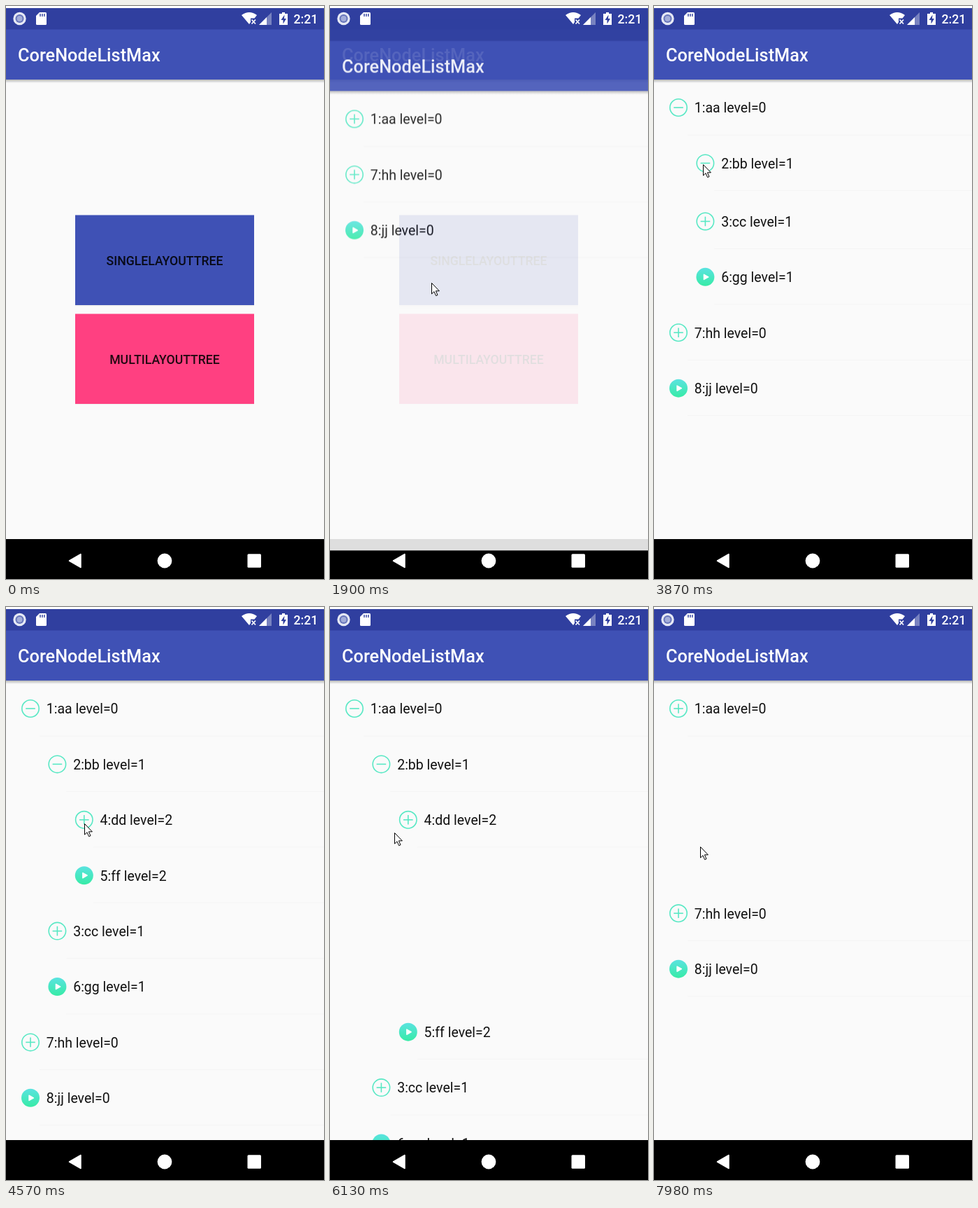
These frames come from a looping animation (455 by 818 pixels, 8 s). An HTML page:

```html
<!DOCTYPE html>
<html lang="en">
<head>
<meta charset="utf-8">
<title>Tree list</title>
<style>
  html, body { margin: 0; width: 100%; height: 100%; overflow: hidden; background: #fff; }
  svg { display: block; width: 455px; height: 818px; font-family: Roboto, sans-serif; }
  .title { font-size: 25.3px; font-weight: 500; fill: #fff; }
  .btn { font-size: 17.7px; font-weight: 500; text-anchor: middle; fill: #000; fill-opacity: .87; }
  .row { font-size: 19.5px; fill: #111; }
  .clock { font-size: 17.7px; font-weight: 500; fill: #fff; }
  .ring { fill: none; stroke: #58e8c4; stroke-width: 1.6; }
</style>
</head>
<body>
<svg viewBox="0 0 455 818">
  <defs>
    <linearGradient id="mint" x1="0" y1="0" x2="0" y2="1">
      <stop offset="0" stop-color="#5ae3e0"/><stop offset="1" stop-color="#37eba6"/>
    </linearGradient>
    <linearGradient id="shade" x1="0" y1="0" x2="0" y2="1">
      <stop offset="0" stop-opacity=".27"/><stop offset="1" stop-opacity="0"/>
    </linearGradient>
    <clipPath id="screen"><rect y="3" width="455" height="815"/></clipPath>
    <g id="minus"><circle class="ring" r="12.2"/><path class="ring" d="M-6.8 0H6.8"/></g>
    <g id="plus"><use href="#minus"/><path class="ring" d="M0-6.8V6.8"/></g>
    <g id="play">
      <circle r="13" fill="url(#mint)"/>
      <path d="M-2-3.6 4.4 0-2 3.6Z" fill="#fff" stroke="#fff" stroke-width="1.4" stroke-linejoin="round"/>
    </g>
    <g id="window">
      <rect y="3" width="455" height="758" fill="#fafafa"/>
      <rect y="761" width="455" height="57" fill="#000"/>
      <rect y="3" width="455" height="31" fill="#303f9f"/>
      <rect y="33.5" width="455" height="71.5" fill="#3f51b5"/>
      <rect y="105" width="455" height="5" fill="url(#shade)"/>
      <text class="title" x="17" y="79">CoreNodeListMax</text>
    </g>
  </defs>

  <g clip-path="url(#screen)">
    <g id="home">
      <use href="#window"/>
      <rect id="lift" x="99" y="420" width="256" fill="url(#shade)"/>
      <rect x="99" y="298.5" width="256" height="128.5" fill="#3f51b5"/>
      <rect x="99" y="566" width="256" height="3" fill="url(#shade)"/>
      <rect x="99" y="439.5" width="256" height="128.5" fill="#ff4081"/>
      <text class="btn" x="227" y="369.5">SINGLELAYOUTTREE</text>
      <text class="btn" x="227" y="510.5">MULTILAYOUTTREE</text>
    </g>
    <g id="list"><use href="#window"/><g id="rows"></g>
      <rect y="761" width="455" height="57" fill="#000"/>
    </g>
  </g>

  <g id="system" fill="#fff">
    <circle cx="19.5" cy="18" r="9.2" fill="#e6e9f5"/>
    <circle cx="19.5" cy="18" r="6" fill="#6674ba"/>
    <circle cx="19.5" cy="18" r="4" fill="#a3add9"/>
    <path d="M48 9H56.5Q58 9 58 10.500V25.500Q58 27 56.500 27H44.500Q43 27 43 25.500V14Z"/>
    <path d="M49 11V15M52 11V15M55 11V15" stroke="#303f9f" stroke-width="1.4"/>
    <path d="M337 13Q348 5 359 13L355.500 17.500H350V23L348 26Z"/>
    <path d="M351.500 19.500 357 25.500M357 19.500 351.500 25.500" stroke="#fff" stroke-width="1.7"/>
    <path d="M380 9V27H362Z" fill-opacity=".35"/>
    <path d="M373 16V27H362Z"/>
    <path d="M395 9H399V11H403V27H391V11H395Z"/>
    <path d="M398.500 12.500 393.500 20H396.500V25.500L401 18H398Z" fill="#303f9f"/>
    <text class="clock" x="411.5" y="24.7">2:21</text>
    <path d="M90.500 792 107 782.500V801.500Z" stroke="#fff" stroke-width="1.5" stroke-linejoin="round"/>
    <circle cx="227" cy="792" r="10.4"/>
    <rect x="345.500" y="782.200" width="19.500" height="19.500" rx="1.5"/>
  </g>
  <path id="cursor" d="M.5.5V16L4 12.700 6.600 18.600 9 17.600 6.400 11.800H11.400Z" fill="#fff" stroke="#000" stroke-linejoin="round"/>
</svg>

<script>
const LOOP = 8000, STEP = 78, PHASE = 178;
const PITCH = 79.4, INDENT = 38.4, TOP = 145;
const MOVE = 350, FADE = 170;
const $ = id => document.getElementById(id);
const clamp = v => Math.min(1, Math.max(0, v));
const ease = v => .5 - .5 * Math.cos(Math.PI * clamp(v));

const node = (text, icon, kids = [], opens = 0, closes = 0) => ({ text, icon, kids, opens, closes });
const leaf = text => node(text, 'play');
const tree = [
  node('1:aa', 'plus', [
    node('2:bb', 'plus', [
      node('4:dd', 'plus', [leaf('9:kk'), leaf('10:ll'), leaf('11:ii')], 4770, 5880),
      leaf('5:ff')
    ], 3810, 6768),
    node('3:cc', 'plus'),
    leaf('6:gg')
  ], 2783, 7734),
  node('7:hh', 'plus'),
  leaf('8:jj')
];

// Pointer stops: time, x, y
const path = [
  [178, 340, 797], [334, 298, 560], [490, 260, 352], [1240, 260, 352],
  [1270, 222, 339], [1370, 222, 339], [1894, 145, 395], [2206, 120, 320],
  [2520, 24, 119], [2785, 34, 140], [2986, 40, 183], [3064, 52, 213],
  [3600, 70, 226], [4210, 70, 226], [4546, 112, 309], [5850, 112, 309],
  [6106, 92, 322], [6574, 76, 231], [6770, 76, 231], [7120, 23, 169],
  [7200, 16, 157], [7354, 33, 156], [7500, 33, 156], [7510, 33, 155],
  [7736, 33, 155], [7978, 66, 342]
];

function build(n, level) {
  const x = INDENT * level;
  const g = document.createElementNS('http://www.w3.org/2000/svg', 'g');
  g.innerHTML = `<path d="M${x + 48} 39H455" stroke="#f4f4f4"/>
    <use x="${x + 35}" href="#${n.icon}"/>
    <text class="row" x="${x + 57.8}" y="7.3">${n.text} level=${level}</text>`;
  n.el = g;
  n.use = g.querySelector('use');
  $('rows').append(g);
  n.kids.forEach(k => build(k, level + 1));
}

// Rows make room first, then children fade in; closing runs the other way round.
function spread(n, t) {
  if (!n.opens || t < n.opens) return { room: 0, alpha: 0, open: false };
  if (t < n.closes) return {
    room: ease((t - n.opens) / MOVE),
    alpha: clamp((t - n.opens - MOVE) / FADE),
    open: true
  };
  return {
    room: 1 - ease((t - n.closes - FADE) / MOVE),
    alpha: 1 - clamp((t - n.closes) / FADE),
    open: false
  };
}

function place(n, y, alpha, t) {
  const s = spread(n, t);
  n.el.setAttribute('transform', `translate(0 ${y.toFixed(2)})`);
  n.el.setAttribute('opacity', alpha);
  if (n.opens) n.use.setAttribute('href', s.open ? '#minus' : '#plus');
  const start = y + PITCH;
  let end = start;
  for (const k of n.kids) end = place(k, end, alpha * s.alpha, t);
  return start + (end - start) * s.room;
}

function pointer(t) {
  const i = path.findIndex(p => p[0] > t);
  if (i < 0) return path[path.length - 1].slice(1);
  if (!i) return path[0].slice(1);
  const [a, b] = [path[i - 1], path[i]];
  const f = (t - a[0]) / (b[0] - a[0]);
  return [1, 2].map(j => Math.round(a[j] + (b[j] - a[j]) * f));
}

function draw(time) {
  const t = time < PHASE ? 0 : PHASE + STEP * Math.floor((time - PHASE) / STEP);

  $('lift').setAttribute('height', 9.5 + 2.5 * clamp((t - 890) / 140));

  const enter = t - 1809;
  const alpha = 1 - (1 - clamp(enter / 200)) ** 4;
  const slide = 65.4 * (1 - clamp(enter / 350)) ** 5;
  $('list').setAttribute('opacity', alpha);
  $('list').setAttribute('transform', `translate(0 ${slide.toFixed(2)})`);

  let y = TOP;
  for (const n of tree) y = place(n, y, 1, t);

  $('cursor').setAttribute('visibility', t < PHASE ? 'hidden' : 'visible');
  $('cursor').setAttribute('transform', `translate(${pointer(t)})`);
}

tree.forEach(n => build(n, 0));
const origin = performance.now();
function tick() {
  draw((performance.now() - origin) % LOOP);
  requestAnimationFrame(tick);
}
tick();
</script>
</body>
</html>
```
